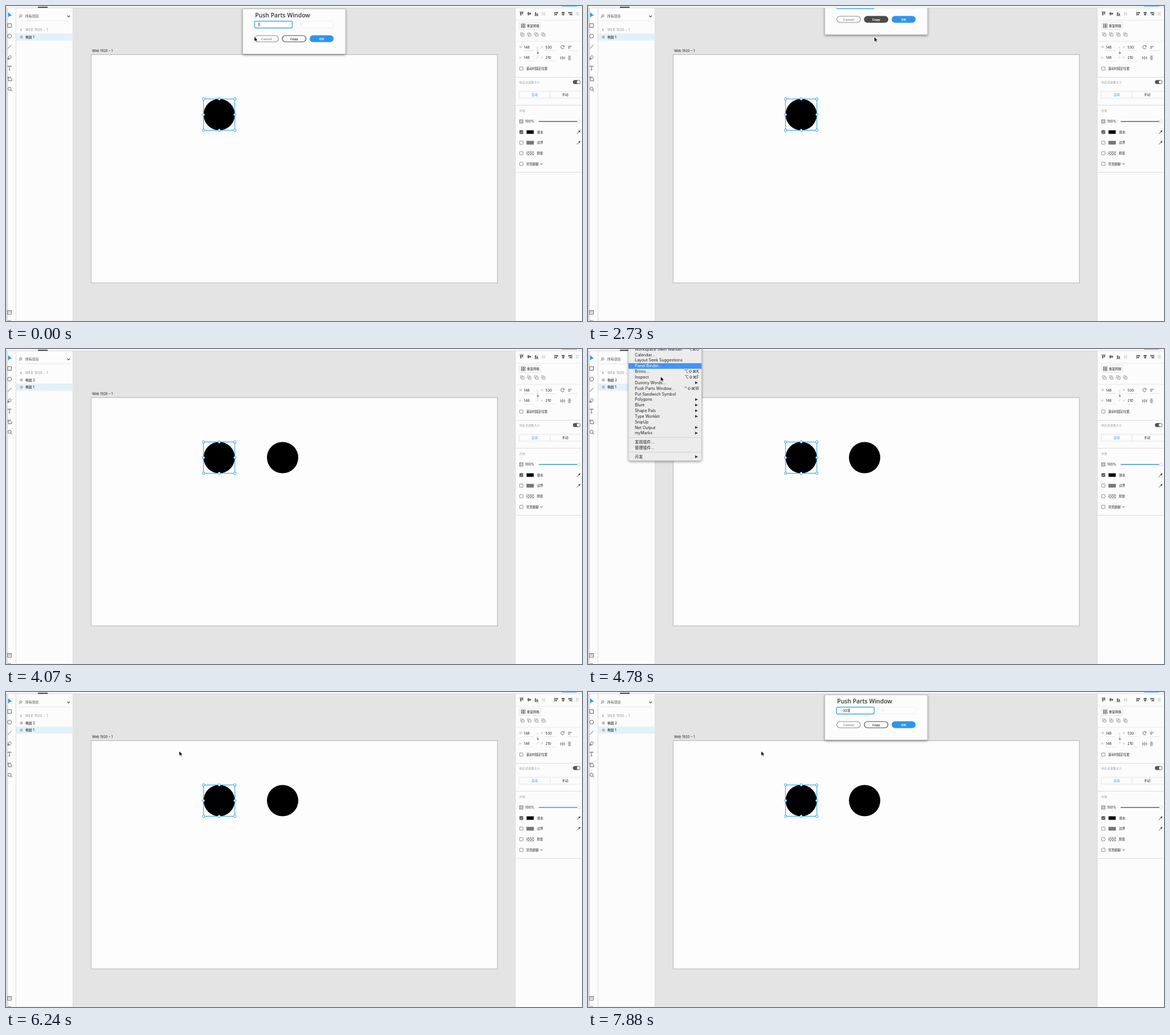
Animation of 1011x554 px, one loop 8 s. Source, as an HTML page:

```html
<!DOCTYPE html>
<html lang="zh-CN">
<head>
<meta charset="utf-8">
<style>
html, body { margin: 0; width: 100%; height: 100%; overflow: hidden; background: #e4e4e4; }
svg { display: block; width: 1011px; height: 554px; }
text { font-family: Inter, "Noto Sans CJK SC", "Noto Sans CJK", "DejaVu Sans", sans-serif; white-space: pre; }
.title { font-family: "Open Sans", sans-serif; font-weight: 600; }
.button { font-family: "Open Sans", sans-serif; font-weight: 700; }
</style>
</head>
<body>
<svg id="stage" viewBox="0 0 1011 554"></svg>
<script>
const BLUE = '#1b9cf2', INK = '#444', MUTED = '#999', PANEL = '#fcfcfc';

// Markup helpers; text is placed by its vertical centre.
const rect = (x, y, w, h, fill, attrs = '') =>
  `<rect x="${x}" y="${y}" width="${w}" height="${h}" fill="${fill}" ${attrs}/>`;
const circle = (x, y, r, fill, attrs = '') =>
  `<circle cx="${x}" cy="${y}" r="${r}" fill="${fill}" ${attrs}/>`;
const path = (d, stroke = INK, width = 0.8, fill = 'none', attrs = '') =>
  `<path d="${d}" stroke="${stroke}" stroke-width="${width}" fill="${fill}" ${attrs}/>`;
const label = (x, y, size, content, fill = INK, attrs = '') =>
  `<text x="${x}" y="${y + size * 0.36}" font-size="${size}" fill="${fill}" ${attrs}>${content}</text>`;
const line = (x1, y, x2, stroke = '#e2e2e2', width = 1) => path(`M${x1} ${y}H${x2}`, stroke, width);
const outline = (color, width = 0.8) => `stroke="${color}" stroke-width="${width}"`;
const group = (id, content, attrs = '') => `<g id="${id}" ${attrs}>${content}</g>`;
const checker = (x, y, columns, rows, size) => {
  let d = '';
  for (let i = 0; i < columns * rows; i++) {
    const column = i % columns, row = Math.floor(i / columns);
    if ((column + row) % 2) d += `M${x + column * size} ${y + row * size}h${size}v${size}h${-size}z`;
  }
  return path(d, 'none', 0, '#999');
};

function toolbar() {
  return rect(0, 3, 17, 551, PANEL) + rect(0, 3, 3.5, 551, '#dedede') +
    path('M4 11.5L10 16.8L6.7 17L4 19.7Z', BLUE, 0.5, BLUE) +
    rect(3, 31, 6.5, 6.5, 'none', outline(INK)) +
    circle(6.2, 53, 3.5, 'none', outline(INK)) +
    path('M3 75L9.5 68.5') +
    path('M3 94L4 89.5L7 87L9.5 89.5L7.2 92.8ZM3 94L6 91') +
    path('M3.2 107V105.8H9V107M6.1 105.8V112.5M4.8 112.5H7.4') +
    path('M4 124V126H8L10 128V131.5H4V126M2.5 126H4M6.5 124.5H8') +
    circle(6.2, 145.6, 2.8, 'none', outline(INK)) + path('M8.2 147.7L10.5 150', INK, 1) +
    rect(2.8, 535.5, 6.5, 6.5, 'none', outline(INK)) + path('M4.3 538H8') +
    path('M3 553.5H9', '#777');
}

function layerRow(name, y) {
  return circle(27, y, 2.3, '#c4c4c4', outline('#999', 0.6)) + label(34, y, 5.8, name, '#222', 'font-weight="500"');
}

function layersPanel() {
  return rect(17.5, 3, 100, 551, PANEL, outline('#d7d7d7')) +
    circle(26, 17.3, 2, 'none', outline(INK, 0.7)) + path('M24.6 18.8L22.8 20.8') +
    label(34, 18, 5.8, '所有项目') + path('M107.5 16.8L109.8 19.2L112.1 16.8', INK, 1.1) +
    line(22, 26, 113, '#e6e6e6') +
    path('M27.4 39.8L25.4 42L27.4 44.2') +
    label(34, 42, 5.5, 'WEB 1920 – 1', '#8a8a8a', 'letter-spacing=".45"') +
    rect(18, 48.3, 99.5, 12.6, '#e3f1fa', 'id="activeRow"') +
    group('newRow', layerRow('椭圆 2', 54.6)) + group('oldRow', layerRow('椭圆 1', 54.6));
}

function alignIcons() {
  const vertical = (x, bar, top) => path(`M${x - 3.5} ${bar}H${x + 3.5}`) +
    rect(x - 2.4, top, 1.8, 5.5, INK) + rect(x + 0.6, top + (bar > 14 ? 2 : bar > 12 ? 1 : 0), 1.8, 3.5, INK);
  const horizontal = (x, bar, left) => path(`M${bar} 10V17`) +
    rect(left, 11, 5.5, 1.8, INK) + rect(left + (bar > x + 1 ? 2 : bar > x - 1 ? 1 : 0), 14.2, 3.5, 1.8, INK);
  return vertical(905, 10.3, 11) + vertical(918.3, 13.5, 10.8) + vertical(931, 17, 11) +
    path('M941.5 10.5V17M945.5 10.5V17M943.5 11.5V16', '#bbb') +
    horizontal(966, 962.8, 963.6) + horizontal(978, 978, 975.2) + horizontal(990, 993.2, 987) +
    path('M999.5 11.5H1006M999.5 15.5H1006M1001 13.5H1004.5', '#bbb');
}

function checkbox(y, checked) {
  return rect(901.6, y - 2.9, 5.8, 5.8, checked ? '#555' : 'none', outline('#666', 0.7) + ' rx=".6"') +
    (checked ? path(`M903 ${y}L904.2 ${y + 1.3}L906.2 ${y - 1.3}`, '#fff') : '');
}

function dropper(y) {
  return path(`M1002 ${y + 3.2}L1006 ${y - 0.8}M1004.7 ${y - 2}L1007.3 ${y + 0.6}`, INK, 1) +
    path(`M1006 ${y - 0.8}L1007.8 ${y - 2.6}`, INK, 2);
}

function fields(y, first, firstValue, second, secondValue, id) {
  return label(901, y, 4.8, first, MUTED) + label(909, y, 6, firstValue, '#222') + line(908, y + 6, 927, '#e6e6e6') +
    label(939, y, 4.8, second, MUTED) + label(947, y, 6, secondValue, '#222', `id="${id}"`) +
    line(946, y + 6, 965, '#e6e6e6');
}

function propertiesPanel() {
  let out = rect(894, 3, 118, 551, PANEL) + path('M894 3V554', '#d5d5d5') + alignIcons();
  for (const y of [25, 62, 125.5, 174.5, 292.5]) out += line(894, y, 1011, y > 100 ? '#dcdcdc' : '#e8e8e8');
  out += rect(901, 28.5, 37.5, 12.8, PANEL, outline('#ddd') + ' rx="1.5"');
  for (const [x, y] of [[904.5, 31.5], [908.5, 31.5], [904.5, 35.5], [908.5, 35.5]])
    out += rect(x, y, 2.6, 2.6, 'none', outline(INK, 0.7));
  out += label(914.3, 35, 5.5, '重复网格', '#222', 'font-weight="500"');
  for (const x of [903, 915.3, 927.8, 940])
    out += rect(x, 47, 4.2, 4.2, 'none', outline('#888', 0.7)) + rect(x + 2, 49, 4.2, 4.2, '#eee', outline('#888', 0.7));
  out += fields(72.5, 'W', '148', 'X', '530', 'xValue') + fields(91, 'H', '148', 'Y', '210', 'yValue') +
    path('M931 72.5H933.5V78M933.5 86V91H931', '#ccc') +
    rect(932, 81.5, 3, 2.5, '#888') + path('M932.4 81.5V79.5H934.5', '#888', 0.6) +
    path('M979.4 70.8A3 3 0 1 0 979.6 73.5M979.8 69.3V71.4H977.8') + label(986.5, 72.5, 6, '0°', '#222') +
    line(986, 78.5, 1004, '#e6e6e6') +
    path('M977 88V94.5') + path('M973.3 89L975.7 91.2L973.3 93.4ZM980.7 89L978.3 91.2L980.7 93.4Z', INK, 0.6) +
    path('M986 91.2H992') + path('M987 88L989 90L991 88ZM987 94.4L989 92.4L991 94.4Z', INK, 0.6);
  out += checkbox(110) + label(913, 110, 5.35, '滚动时固定位置', '#222') +
    label(901, 134, 4.8, '响应式调整大小', MUTED, 'letter-spacing=".4"') +
    rect(995, 130.3, 13.3, 7, '#555', 'rx="3.5"') + circle(1004.8, 133.8, 2.7, '#fff') +
    rect(901, 150, 112, 12, PANEL, outline('#ddd')) + path('M955 150V162', '#ddd') +
    label(928, 156, 5.4, '自动', BLUE, 'text-anchor="middle" font-weight="500"') +
    label(981.5, 156, 5.4, '手动', '#222', 'text-anchor="middle" font-weight="500"') +
    label(901, 184, 4.8, '外观', MUTED, 'letter-spacing=".4"');
  out += checker(901.5, 200, 4, 4, 1.5) + rect(901.5, 200, 6, 6, 'none', outline('#666', 0.7)) +
    label(911.3, 203, 6, '100%', '#222') + rect(935, 202.4, 68, 1.4, '#555', 'id="slider"') +
    circle(1005.5, 203, 2.7, '#fff', outline('#ccc'));
  [['填充', '#000'], ['边界', '#767676'], ['阴影', '#eee']].forEach(([name, fill], i) => {
    const y = 221.7 + i * 18.6;
    out += checkbox(y, i === 0) + rect(913.8, y - 3, 12.4, 6.2, fill, outline('#888', 0.5)) +
      (i === 2 ? checker(914, y - 3, 6, 3, 2) : dropper(y)) + label(932, y, 5.4, name, '#222');
  });
  return out + checkbox(277.7) + label(913, 277.7, 5.4, '背景模糊', '#222') +
    path('M938 276.7L940 278.8L942 276.7', INK, 1);
}

function artboard() {
  let handles = rect(-27.5, -27.5, 55, 55, 'none', outline(BLUE, 1));
  for (const x of [-1, 0, 1]) for (const y of [-1, 0, 1])
    if (x || y) handles += circle(x * 27.5, y * 27.5, 2.1, '#fff', outline(BLUE, 1));
  return label(151, 79, 5.9, 'Web 1920 – 1', '#222') +
    rect(149.5, 85.5, 713, 401.5, '#fdfdfd', outline('#b4b4b4', 1)) +
    circle(374.2, 191, 27.5, '#000') +
    circle(485.5, 191, 27.5, '#000', 'id="copy"') +
    circle(374.2, 191, 27.2, 'none', outline(BLUE, 1) + ' id="hover"') +
    group('selection', handles);
}

function button(id, x, name, color) {
  return rect(x, 52, 41.5, 11, PANEL, `${outline(color, 1.2)} rx="5.5" id="${id}Box"`) +
    label(x + 20.75, 57.5, 5.8, name, color, `class="button" text-anchor="middle" id="${id}Text"`);
}

function dialog() {
  return group('dialog',
    rect(415.5, 5, 180.5, 79.5, PANEL, outline('#aaa', 0.7) + ' rx="1.5" filter="url(#shadow)"') +
    label(437.3, 16.7, 10.4, 'Push Parts Window', '#333', 'class="title"') +
    rect(436.3, 26.6, 66, 12, '#fff', outline(BLUE, 1.2) + ' rx="2"') +
    rect(509, 26.8, 66, 11.6, '#fdfdfd', outline('#ebebeb', 0.8) + ' rx="2"') +
    label(516, 32.6, 6, 'Y', '#ccc') + label(444.2, 32.6, 6, 'X', '#ccc', 'id="placeholder"') +
    label(444.2, 32.6, 6, '', '#333', 'id="entry"') + rect(443.6, 29, 0.9, 7, '#222', 'id="caret"') +
    button('cancel', 436.6, 'Cancel', '#8e8e8e') + button('copyButton', 485, 'Copy', '#4b4b4b') +
    rect(533, 51.5, 42, 12, '#2d95ee', 'rx="6"') +
    label(554, 57.5, 5.8, 'OK', '#fff', 'class="button" text-anchor="middle"'));
}

const ROW = 9.85;
const MENU = [
  ['Workspace Swift Wander', '⌥⌘O'], ['Calendar...'], ['Layout Seek Suggestions'], ['Panel Binder...'],
  ['Brimo...', '⌥⇧⌘K'], ['Inspect', '⌥⇧⌘F'], ['Dummy Words...', '▶'], ['Push Parts Window...', '⌃⇧⌘W'],
  ['Put Sandwich Symbol'], ['Polygons', '▶'], ['Blunt', '▶'], ['Shape Pals', '▶'], ['Type Workkit', '▶'],
  ['SnipUp'], ['Net Output', '▶'], ['myMarks', '▶'], ['发现插件...'], ['管理插件...'], ['开发', '▶']
];

function menu() {
  let out = rect(71, -8, 128.5, 204.5, '#ececec', outline('#b5b5b5', 0.6) + ' rx="3" filter="url(#shadow)"') +
    rect(71, 0, 128.5, ROW, '#4294f7', 'id="menuMark"') +
    line(71, 155.5, 199.5, '#d3d3d3') + line(71, 181.5, 199.5, '#d3d3d3');
  MENU.forEach(([name, extra], i) => {
    const y = 0.2 + i * ROW + (i > 15 ? 6 : 0) + (i > 17 ? 6 : 0);
    out += label(82.3, y, 7, name, '#222', `id="item${i}"`);
    if (extra === '▶') out += path(`M188 ${y - 2.4}L193 ${y}L188 ${y + 2.4}Z`, 'none', 0, '#333');
    else if (extra) out += label(195, y, 7, extra, '#222', 'text-anchor="end"');
  });
  return group('menu', out);
}

const stage = document.getElementById('stage');
stage.innerHTML = `<defs>
  <filter id="shadow" x="-10%" y="-15%" width="120%" height="135%"><feDropShadow dx="0" dy="1.5" stdDeviation="2" flood-opacity=".4"/></filter>
  <clipPath id="below"><rect y="3.5" width="1011" height="551"/></clipPath></defs>` +
  rect(0, 0, 1011, 554, '#e4e4e4') + artboard() + toolbar() + layersPanel() + propertiesPanel() +
  rect(0, 0, 1011, 3, '#f8f8f8') + line(0, 3.2, 1011, '#d0d0d0', 0.7) + rect(56, 1.4, 17, 1.8, '#333') +
  path('M974 -2Q974 .7 977 .7H1001Q1004 .7 1004 -2Z', 'none', 0, '#2d95ee') +
  `<g clip-path="url(#below)">${dialog()}</g>` + menu() +
  path('M0 0V8.2L2 6.4L3.4 9.3L4.8 8.7L3.5 5.9H6Z', '#fff', 0.6, '#000', 'id="cursor"');

// Each step lists only what changes; sheet is the dialog's vertical offset, or null when closed.
const STEPS = [
  [0, { cursor: [436, 54], sheet: 0, hovered: '', entry: '', caret: true, copied: false, active: 1, focused: false, over: false, item: null }],
  [180, { cursor: [437, 51], hovered: 'cancel' }],
  [470, { caret: false }],
  [920, { caret: true }],
  [1400, { entry: '30' }],
  [1550, { entry: '300' }],
  [1840, { cursor: [460, 55] }],
  [2020, { cursor: [497, 56], hovered: 'copyButton' }],
  [2200, { cursor: [502.5, 54.5] }],
  [2380, { caret: false }],
  [2550, { sheet: -3 }],
  [2730, { sheet: -34 }],
  [2910, { sheet: null, cursor: [500, 62], hovered: '' }],
  [3090, { copied: true, active: 2, focused: true, cursor: [478, 110] }],
  [3280, { cursor: [428, 176] }],
  [3500, { cursor: [376, 198], over: true }],
  [3680, { active: 1, over: false }],
  [3860, { cursor: [168, 45] }],
  [4070, { cursor: null }],
  [4430, { item: -1 }],
  [4600, { item: 1, cursor: [120, 8] }],
  [4780, { item: 3, cursor: [127.5, 48.5] }],
  [4960, { item: 6, cursor: [128, 60] }],
  [5140, { item: 7, cursor: [128, 68] }],
  [5500, { cursor: [130, 69] }],
  [5680, { item: null }],
  [5860, { cursor: [215, 85] }],
  [6060, { cursor: [304, 104] }],
  [6420, { sheet: -38, entry: '', caret: false }],
  [6600, { sheet: 0, caret: true, focused: false }],
  [7230, { caret: false }],
  [7440, { entry: '-', caret: true }],
  [7730, { entry: '-30' }],
  [7880, { entry: '-300' }]
];

const byId = id => document.getElementById(id);
const set = (id, name, value) => byId(id).setAttribute(name, value);
const show = (id, visible) => set(id, 'visibility', visible ? 'inherit' : 'hidden');
const move = (id, x, y) => set(id, 'transform', `translate(${x} ${y})`);

function render(s) {
  show('cursor', s.cursor);
  if (s.cursor) move('cursor', ...s.cursor);

  show('dialog', s.sheet !== null);
  move('dialog', 0, s.sheet || 0);
  for (const [id, color] of [['cancel', '#969696'], ['copyButton', '#4b4b4b']]) {
    set(id + 'Box', 'fill', s.hovered === id ? color : PANEL);
    set(id + 'Text', 'fill', s.hovered === id ? '#fff' : color);
  }
  byId('entry').textContent = s.entry;
  show('placeholder', !s.entry);
  show('caret', s.caret);
  move('caret', s.entry ? byId('entry').getComputedTextLength() + 0.3 : 0, 0);

  show('copy', s.copied);
  show('hover', s.over);
  show('newRow', s.copied);
  move('oldRow', 0, s.copied ? 12.5 : 0);
  move('activeRow', 0, s.copied && s.active === 1 ? 12.5 : 0);
  move('selection', s.active === 1 ? 374.2 : 485.5, 191);
  byId('xValue').textContent = s.active === 1 ? '530' : '830';
  set('slider', 'fill', s.focused ? '#2d8fee' : '#555');

  show('menu', s.item !== null);
  show('menuMark', s.item !== null && s.item >= 0);
  set('menuMark', 'y', (s.item || 0) * ROW - 4.6);
  MENU.forEach((_, i) => set('item' + i, 'fill', i === s.item ? '#fff' : '#222'));
}

let shown = -1;
function tick() {
  const time = performance.now() % 8000;
  const current = STEPS.findLastIndex(([start]) => start <= time);
  if (current !== shown) {
    shown = current;
    render(Object.assign({}, ...STEPS.slice(0, current + 1).map(([, change]) => change)));
  }
  requestAnimationFrame(tick);
}
tick();
</script>
</body>
</html>
```
